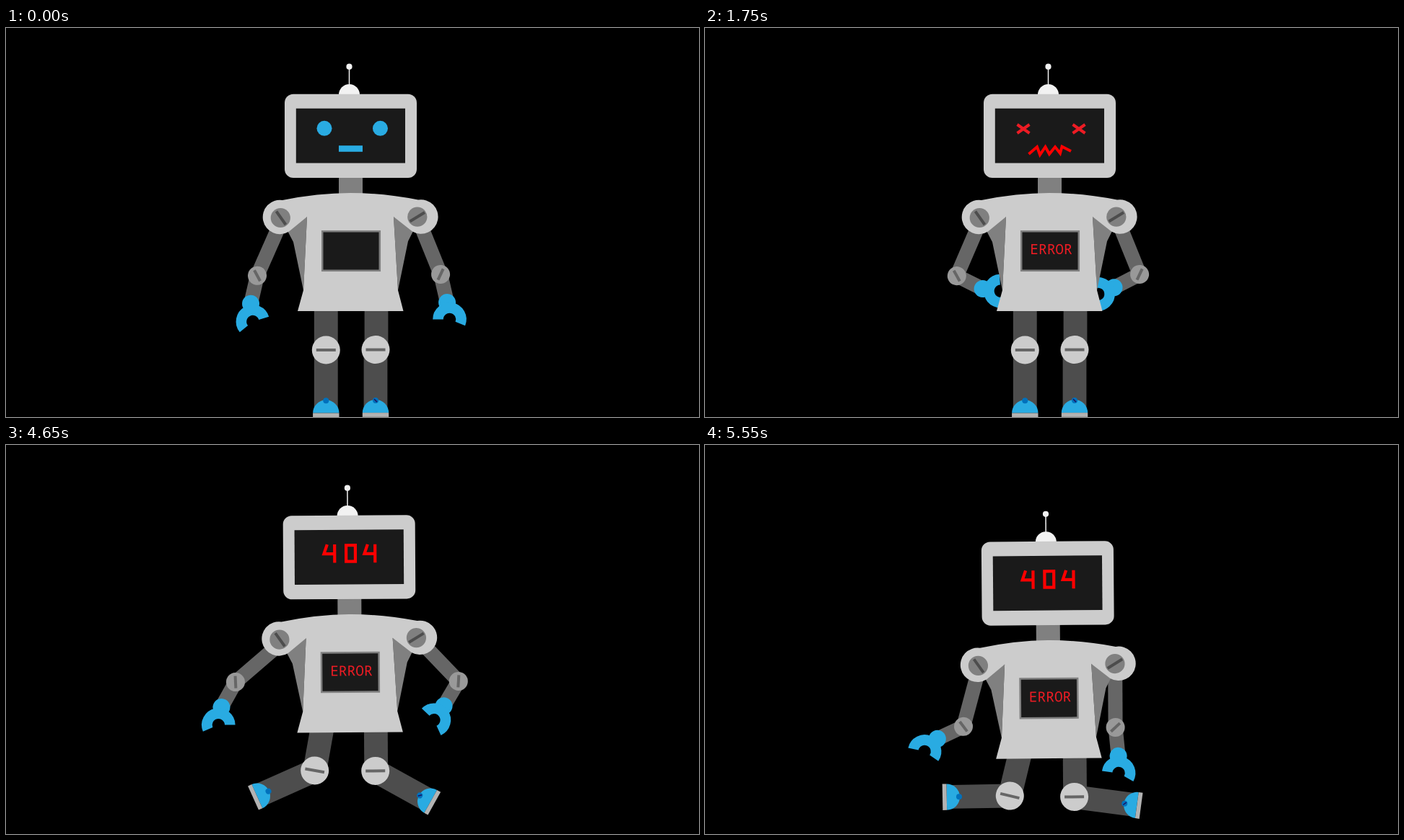
Write an HTML page that moves like this. It is 960 by 540 pixels and loops after 6.05 s.

```html
<!DOCTYPE html>
<html lang="en">
<head>
<meta charset="utf-8">
<title>Robot 404</title>
<style>
  html, body { margin: 0; width: 100%; height: 100%; overflow: hidden; background: #000; }
  svg { display: block; width: 100vw; height: 100vh; }
  .line { fill: none; }
  .arm { stroke: #666; stroke-width: 20; }
  .slot { stroke: #666; stroke-width: 4; }
  .shell { fill: #ccc; }
  .metal { fill: #808080; }
  .blue { fill: #29abe2; }
  .glass { fill: #1a1a1a; }
  .leg { fill: #4d4d4d; }
  .white { fill: #f2f2f2; }
</style>
</head>
<body>
<svg viewBox="0 0 960 540">
  <defs>
    <g id="shin">
      <rect class="leg" x="-16.4" width="32.8" height="80"/>
      <path class="blue" d="M-18.2 87.5a18.2 18.2 0 0 1 36.4 0z"/>
      <rect x="-18.2" y="87.5" width="36.4" height="5.8" fill="#b3b3b3"/>
      <circle cy="70.3" r="4" fill="#0071bc"/>
    </g>
    <g id="knee">
      <circle class="shell" r="19.5"/>
      <path class="slot" d="M-13.5 0h27" stroke-width="3.5"/>
    </g>
    <g id="forearm">
      <path class="arm" d="M0 0V40"/>
      <circle class="blue" cy="40" r="12"/>
    </g>
    <path id="claw" class="line" stroke="#29abe2" stroke-width="14.6" d="M-15.7 2.9A16 16 0 1 1 15.7 2.9"/>
    <g id="elbow">
      <circle r="13" fill="#999"/>
      <path class="slot" d="M0 -8.5v17"/>
    </g>
    <path id="four" d="M447 132L442.5 145H459M457.3 132V157.5"/>
    <path id="cross" d="M-8.5 -6L8.5 6M-8.5 6L8.5 -6"/>
  </defs>

  <g id="body">
    <g id="leftArm">
      <path class="arm" d="M0 5V81.2"/>
      <g transform="translate(0 81.2)">
        <g id="leftFore">
          <use href="#forearm"/>
          <use href="#claw" transform="translate(8.5 63.7) rotate(-41)"/>
        </g>
        <use href="#elbow" transform="rotate(-52)"/>
      </g>
    </g>
    <g id="rightArm">
      <path class="arm" d="M5 15L0 86.8"/>
      <g transform="translate(0 86.8)">
        <g id="rightFore">
          <use href="#forearm"/>
          <use href="#claw" transform="translate(-2 63.8) rotate(24)"/>
        </g>
        <use href="#elbow" transform="rotate(51)"/>
      </g>
    </g>

    <g id="leftLeg">
      <rect class="leg" x="-16.4" y="20" width="32.8" height="65"/>
      <g transform="translate(0 85)">
        <use id="leftShin" href="#shin"/>
        <use href="#knee"/>
      </g>
    </g>
    <rect class="leg" x="496.6" y="382" width="32.8" height="64"/>
    <g transform="translate(512 446.6)">
      <g id="rightShin">
        <use href="#shin"/>
        <path d="M-2 68.5l4 4" stroke="#1b1464" stroke-width="1.5"/>
      </g>
      <use href="#knee"/>
    </g>

    <path class="metal" d="M461 205h33v28h-33zM417 262L412 364L398 297L387 276zM537 262L543 364L557 296L567 276z"/>
    <path class="shell" d="M383 239Q432 229 477 229T571 238.600A23.700 23.700 0 1 1 563 282.500L537 262L543 364L550.500 393H404L412 364L417 262L392 282.500A23.700 23.700 0 1 1 383 239z"/>
    <circle class="metal" cx="380.300" cy="263.500" r="13.600"/>
    <circle class="metal" cx="569.800" cy="262.200" r="13.600"/>
    <path d="M374.500 254.500L387.500 273M559.500 268.500L580 256" stroke="#4d4d4d" stroke-width="4"/>
    <rect class="glass" x="438.200" y="282.200" width="79.600" height="54.600" stroke="#808080" stroke-width="2.500"/>
    <text id="error" x="479.500" y="314.300" text-anchor="middle" fill="#ed1c24" font-size="19.500" font-family="'Noto Sans Mono', monospace">ERROR</text>

    <path class="white" d="M461 92.500a14.500 14.500 0 0 1 29 0z"/>
    <path d="M475.500 55V80" stroke="#f2f2f2" stroke-width="1.500"/>
    <circle class="white" cx="475.500" cy="53.700" r="4.100"/>
    <rect class="shell" x="386" y="91.700" width="183" height="116.200" rx="12"/>
    <rect class="glass" x="401.800" y="111.700" width="151.200" height="75.800"/>

    <g id="eyes" class="blue">
      <circle cx="441" cy="139.300" r="10.500"/>
      <circle cx="518.500" cy="139.300" r="10.500"/>
    </g>
    <rect id="mouth" class="blue" x="461" y="163.200" width="33" height="8.600"/>
    <g id="crosses" stroke="#ed1c24" stroke-width="4">
      <use href="#cross" x="441" y="140"/>
      <use href="#cross" x="518" y="140"/>
    </g>
    <path id="zigzag" class="line" stroke="#f00" stroke-width="3.800" d="M448.500 175L460 165L464 176L471.500 165L477 175L485 165L492 174L494.500 164.500L507 171"/>
    <g id="code" class="line" stroke="#f00" stroke-width="4.200">
      <use href="#four"/>
      <rect x="473.200" y="133.200" width="12.800" height="22.400"/>
      <use href="#four" x="56"/>
    </g>
  </g>
</svg>
<script>
const LOOP = 6050, STEP = 50;
const part = id => document.getElementById(id);
const place = (id, transform) => part(id).setAttribute('transform', transform);
const show = (id, on) => part(id).setAttribute('visibility', on ? 'visible' : 'hidden');
const within = (t, from, to) => t >= from && t < to;
const smooth = u => u * u * (3 - 2 * u);
const progress = (t, from, to) => smooth(Math.min(1, Math.max(0, (t - from) / (to - from))));

// Each key is [time, angle in degrees].
const motion = {
  leftArm: [[0, 23.8], [400, 23.8], [540, 55], [950, 23.2], [4150, 23.2], [4200, 38], [4250, 38], [4850, 53.6], [5450, 15.4]],
  leftFore: [[0, 13], [400, 13], [540, 26], [950, -63.4], [4150, -63.4], [4200, -48.5], [4250, -48.5], [4850, 56.8], [5550, 65.2]],
  rightArm: [[0, -26], [150, -48], [400, -26], [4150, -26], [4200, -41.5], [4250, -41.5], [4850, -49.4], [5100, -38], [5450, -3.8]],
  rightFore: [[0, -13], [150, -20], [400, 62.8], [4150, 62.8], [4200, 47.5], [4250, 47.5], [4850, 25], [5100, -32], [5450, -5.3]]
};

function angleAt(keys, t) {
  const next = keys.findIndex(key => key[0] > t);
  if (next < 0) return keys[keys.length - 1][1];
  const [t0, a0] = keys[next - 1], [t1, a1] = keys[next];
  return a0 + (a1 - a0) * progress(t, t0, t1);
}

function fallAt(t) {
  if (t < 4300) return 0;
  if (t < 4900) return 44 * ((t - 4300) / 600) ** 3.7;
  return 42.1 + 1.9 * Math.max(0, 1 - (t - 4900) / 100);
}

function draw(t) {
  const angle = name => angleAt(motion[name], t);
  place('leftArm', `translate(380.8 269.5) rotate(${angle('leftArm')})`);
  place('leftFore', `rotate(${angle('leftFore') - angle('leftArm')})`);
  place('rightArm', `translate(564 264) rotate(${angle('rightArm')})`);
  place('rightFore', `rotate(${angle('rightFore') - angle('rightArm')})`);

  const bend = progress(t, 4250, 4850);
  place('body', `translate(0 ${fallAt(t)}) rotate(${-0.45 * bend} 477 500)`);
  place('leftLeg', `translate(443.3 362) rotate(${14 * bend})`);
  place('leftShin', `rotate(${75.4 * bend})`);
  place('rightShin', `rotate(${-81.9 * bend})`);

  show('eyes', t < 1100 || within(t, 1250, 1350));
  show('mouth', t < 1300);
  show('crosses', within(t, 1350, 2500));
  show('zigzag', within(t, 1300, 2500));
  const wobble = 0.75 + 0.25 * Math.cos((t - 1750) / 80);
  place('zigzag', `translate(0 170) scale(1 ${wobble}) translate(0 -170)`);
  show('error', t >= 2500 || (t >= 1300 && t % 200 >= 100));
  show('code', within(t, 2800, 3700) || within(t, 3750, 3800) || within(t, 3850, 3950) || t >= 4200);
}

const start = performance.now();
function tick() {
  const elapsed = (performance.now() - start) % LOOP;
  draw(Math.floor(elapsed / STEP) * STEP);
  requestAnimationFrame(tick);
}
tick();
</script>
</body>
</html>
```
